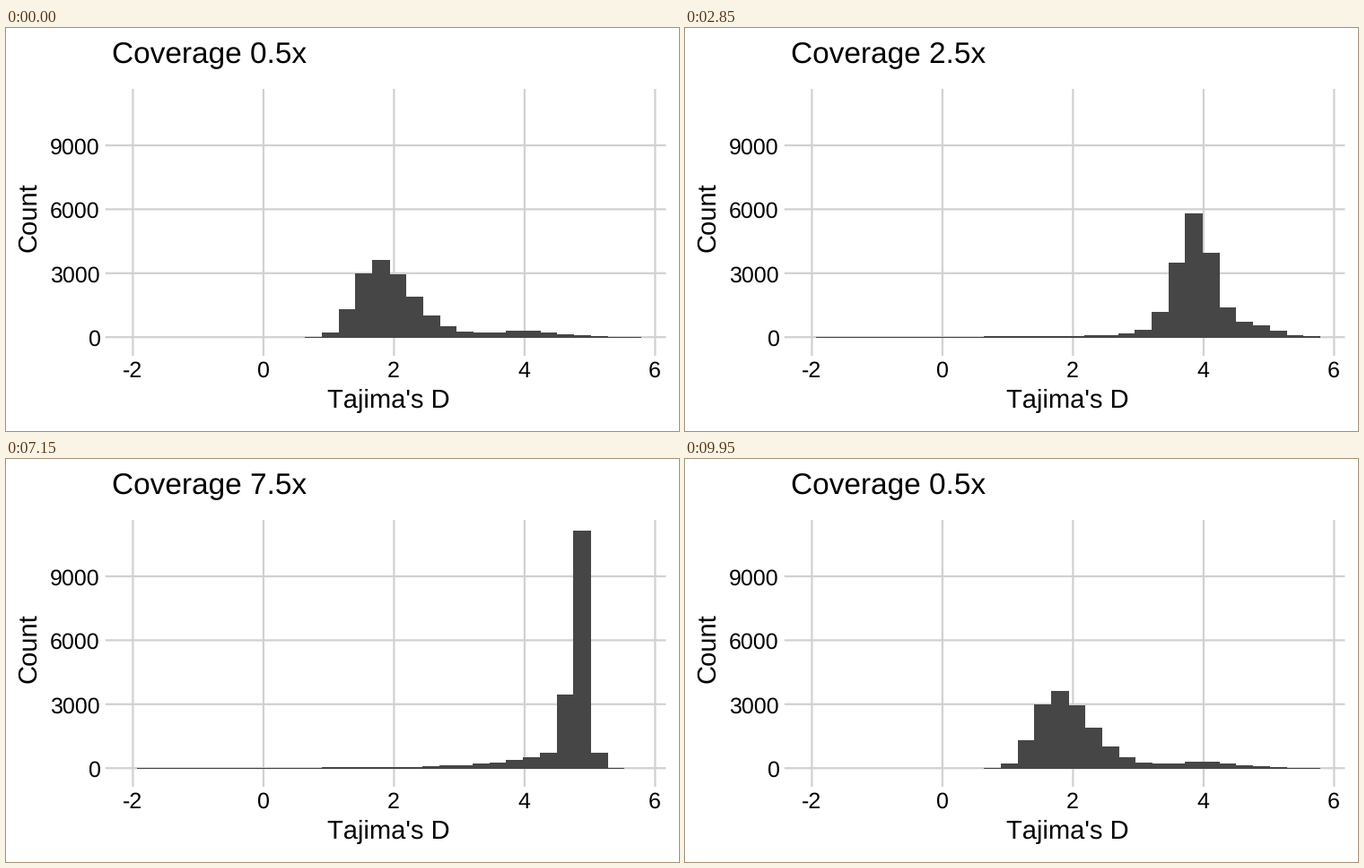
Animation, 750 px wide and 450 px high, one loop 10000 ms. Source, as a matplotlib script:

```python
import matplotlib.pyplot as plt
import numpy as np
from matplotlib.animation import FuncAnimation

plt.rcParams.update({
    "font.family": "Liberation Sans",
    "text.hinting": "none",
    "text.kerning_factor": 6,  # practically no kerning
})

W, H, DPI = 750, 450, 150
LEFT, RIGHT, TOP, BOTTOM = 118.1, 735.4, 68.0, 358.7  # plot panel, px
TICK = 7.3
BASE = 345.2          # y of count 0
PX_PER_COUNT = 0.0238
BINS = np.arange(30)
EDGES = 146.75 + 18.69 * np.arange(len(BINS) + 1)
BAR, GRID = "#464646", "#d1d1d1"

FRAMES, INTERVAL, STEPS = 200, 50, 9
STARTS = [20, 49, 78, 106, 135, 163, 191]  # first frame of each transition


def peak(height, mode, sigma, skew=0):
    """Bell curve over the bins; skew bends it to a log-normal shape."""
    d = BINS - mode
    if skew:
        d = np.log(np.maximum(1 + skew * d, 1e-6)) / skew
    return height * np.exp(-d ** 2 / (2 * sigma ** 2))


def tail(height, end, decay=0.72):
    """Counts growing by a fixed ratio up to the bin `end`."""
    return np.where(BINS <= end, height * decay ** (1.0 * end - BINS), 0)


STATES = [
    ("0.5x", peak(3600, 13.9, 1.58, 0.156) + peak(265, 22.7, 1.9)),
    ("1.5x", peak(4015, 17.08, 1.42, 0.052) + peak(570, 24.4, 1.8, -0.2)),
    ("2.5x", tail(450, 22) + peak(5150, 22.12, 1.05, -0.08)
     + peak(680, 24.9, 1.7, -0.07)),
    ("3.5x", tail(580, 24) + peak(7480, 25, 0.775, -0.3)
     + peak(460, 27, 0.95)),
    ("5x", tail(860, 25) + peak(8950, 26.27, 0.67)),
    ("7.5x", tail(950, 25) + peak(11650, 25.85, 0.484)),
    ("10x", tail(1500, 22, 0.57) + peak(11620, 22.7, 0.501)),
]

fig = plt.figure(figsize=(W / DPI, H / DPI), dpi=DPI, facecolor="white")
ax = fig.add_axes([0, 0, 1, 1])
ax.set(xlim=(0, W), ylim=(H, 0))
ax.axis("off")


def grid_line(xs, ys):
    ax.plot(xs, ys, color=GRID, lw=2.22 * 72 / DPI, solid_capstyle="butt",
            snap=False, zorder=1)


def label(x, y, text, size, ha="center", **kw):
    return ax.text(x, y, text, fontsize=size, ha=ha, va="baseline",
                   color="black", **kw)


for count in range(0, 9001, 3000):
    y = BASE - count * PX_PER_COUNT
    grid_line([LEFT - TICK, RIGHT], [y, y])
    label(104.6, y + 9.5, str(count), 12, ha="right")

for value in range(-2, 7, 2):
    x = 286.9 + 72.75 * value
    grid_line([x, x], [TOP, BOTTOM + TICK])
    label(x - 0.7, 390, str(value), 12)

label((LEFT + RIGHT) / 2, 424, "Tajima's D", 14)
label(33.2, (TOP + BOTTOM) / 2 - 2.2, "Count", 14, rotation=90,
      rotation_mode="anchor")
title = label(LEFT, 38, "", 16, ha="left")

outline_x = np.repeat(EDGES, 2)
bars, = ax.fill(outline_x, np.full(outline_x.size, BASE), color=BAR, lw=0,
                antialiased=False, snap=False, zorder=2)


def state_at(frame):
    """Previous state, next state and progress between them."""
    past = [i for i, start in enumerate(STARTS) if frame >= start]
    if not past:
        return STATES[0], STATES[0], 1.0
    i = past[-1]
    progress = min((frame - STARTS[i] + 1) / STEPS, 1.0)
    return STATES[i], STATES[(i + 1) % len(STATES)], progress


def draw(frame):
    (old_name, old), (new_name, new), t = state_at(frame)
    counts = old * (1 - t) + new * t
    tops = np.repeat(BASE - counts * PX_PER_COUNT, 2)
    bars.set_xy(np.column_stack([outline_x, np.r_[BASE, tops, BASE]]))
    title.set_text("Coverage " + (new_name if t > 0.5 else old_name))
    return bars, title


anim = FuncAnimation(fig, draw, frames=FRAMES, interval=INTERVAL,
                     init_func=lambda: draw(0), repeat=True, blit=False)
plt.show()
```
